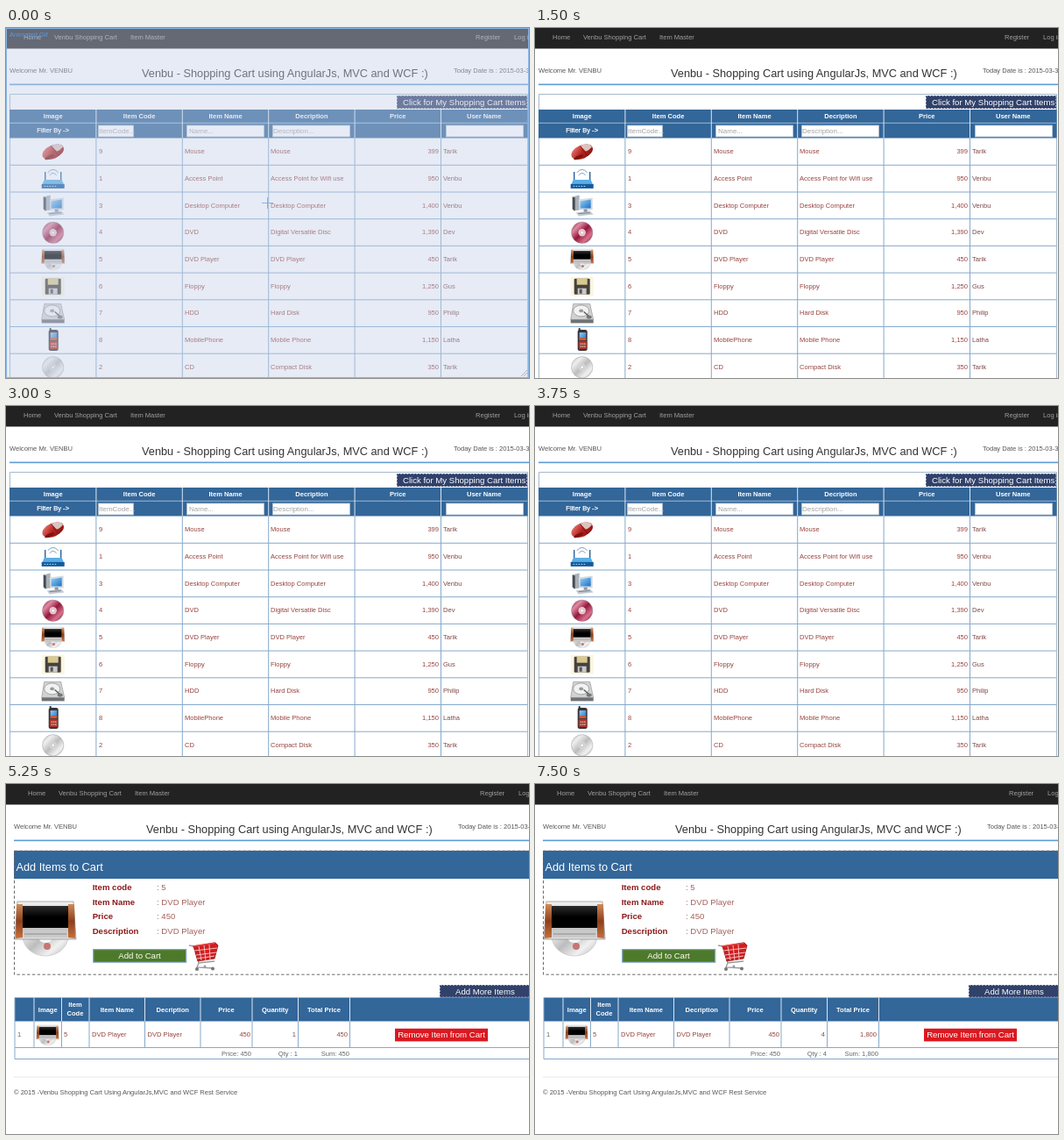
These frames come from a looping animation (597x399 px, 8 s). An HTML page:

```html
<!DOCTYPE html>
<html lang="en">
<head>
<meta charset="utf-8">
<title>Shopping cart</title>
<style>
  html, body { margin: 0; width: 100%; height: 100%; overflow: hidden; background: #fff; }
  svg { display: block; width: 597px; height: 399px; overflow: hidden; }
  text { font-family: "Liberation Sans", Arial, sans-serif; font-size: 7.55px; white-space: pre; }
  .b { font-weight: bold; }
  .m { text-anchor: middle; }
  .e { text-anchor: end; }
  .h1 { font-size: 12.75px; }
  .h2 { font-size: 9.6px; }
  .ph { font-size: 8px; }
  .kr { font-family: "Noto Sans CJK KR", "Noto Sans CJK", "Open Sans", sans-serif; }
</style>
</head>
<body>
<svg id="stage" viewBox="0 0 597 399" xmlns="http://www.w3.org/2000/svg"></svg>
<script>
const LOOP = 8000, STEP = 750;
const BLUE = '#336699', NAVY = '#30416a', GRID = '#86a9cb', ITEM = '#97433f', WHITE = '#fff';

const text = (x, y, s, fill, cls = '', extra = '') =>
  `<text x="${x}" y="${y}" fill="${fill}" class="${cls}" ${extra}>${s}</text>`;
const rect = (x, y, w, h, fill, extra = '') =>
  `<rect x="${x}" y="${y}" width="${w}" height="${h}" fill="${fill}" ${extra}/>`;
const path = (d, fill, extra = '') => `<path d="${d}" fill="${fill}" ${extra}/>`;
const line = (d, stroke, w = 1, extra = '') => path(d, 'none', `stroke="${stroke}" stroke-width="${w}" ${extra}`);
const oval = (x, y, rx, ry, fill, extra = '') =>
  `<ellipse cx="${x}" cy="${y}" rx="${rx}" ry="${ry}" fill="${fill}" ${extra}/>`;
const group = (body, transform = '', id = '') =>
  `<g ${id && `id="${id}"`} ${transform && `transform="${transform}"`}>${body}</g>`;
const gradient = (id, dir, ...stops) =>
  `<linearGradient id="${id}" ${dir}>${stops.map((c, i) =>
    `<stop offset="${i / (stops.length - 1)}" stop-color="${c}"/>`).join('')}</linearGradient>`;
const DOWN = 'x1="0" y1="0" x2="0" y2="1"', DIAG = 'x1="0" y1="0" x2="1" y2="1"';

const defs = `<defs>
  ${gradient('silver', DOWN, '#f4f4f4', '#a9a9a9', '#e3e3e3')}
  ${gradient('wood', DOWN, '#d08a56', '#8c3f1c', '#c8703a')}
  ${gradient('screen', DOWN, '#2c2c2c', '#000', '#000')}
  ${gradient('red', DIAG, '#e88', '#b8231d', '#7c100d')}
  ${gradient('pink', DIAG, '#7c1330', '#e08aa4', '#94183c', '#d8718d', '#6d0f2a')}
  ${gradient('grey', DIAG, '#bbb', '#eee', '#bdbdbd', '#f1f1f1', '#b5b5b5')}
  ${gradient('sky', DIAG, '#8fd0f7', '#1d6fc4')}
</defs>`;

// Icons are drawn around their own centre.
const disc = (fill, hub) => oval(0, 0, 12.2, 12.2, fill, 'stroke="#888" stroke-width=".4"') +
  oval(0, 0, 4.2, 4.2, hub) + oval(0, 0, 1.7, 1.7, WHITE, 'stroke="#999" stroke-width=".4"');

const player =
  oval(0, 8, 26, 23, 'url(#grey)', 'stroke="#bbb" stroke-width=".6"') +
  oval(0, 12, 7, 4, '#f7f7f7') + oval(2, 20, 4, 4, '#c77671') +
  path('M-32-31H32L35 12H-35Z', 'url(#silver)', 'stroke="#777" stroke-width=".6"') +
  path('M-33-28H-26V10L-34 11Z M33-28H26V10L34 11Z', 'url(#wood)') +
  rect(-26, -26, 52, 25, 'url(#screen)') + rect(-25, 2, 50, 8, '#c9c9c9') +
  line('M-24 6H24', '#8e8e8e', 1.2);

const basket =
  line('M-16-13L-10-12 L-5 7 L13 5 M-5 7L-7 12L12 13', '#999', 1.3) +
  path('M-11-12L14-16L17-13L13 2L-6 5Z', '#d21d1f', 'stroke="#8e1012" stroke-width=".8"') +
  line('M-10-7L16-10 M-8-2L15-5 M-7 2L13-1 M-5-12L-2 4 M1-13L3 4 M7-14L8 3', '#f4cfcf', .9) +
  line('M-12-12L14-16', '#e9494b', 1.5) +
  oval(-7, 14, 2, 2, '#777') + oval(11, 13.5, 2, 2, '#777') + oval(2, 11, 1.4, 1.4, '#999');

const icons = {
  mouse: group(oval(0, 0, 13, 7.6, 'url(#red)') + path('M1-7Q10-8 13-1Q8 2 4 1Z', '#d9c4c0') +
    line('M1-7Q2-1 4 7', '#6f1310', .7) + oval(-6, 4, 6, 2, '#7a1512'), 'rotate(-24)'),
  router: line('M-9 3V-8 M9 3V-8', '#2a5f9e', 1.4) +
    line('M-6-7Q0-14 6-7 M-4-4Q0-9 4-4', '#7a9cc0', 1) +
    path('M-10 1H10L13 8H-13Z', '#58aee4') + rect(-13, 6, 26, 5, '#155a9f') +
    line('M-10 8.5H4', '#bfe4ff', 1, 'stroke-dasharray="1.5 1.5"'),
  desktop: path('M-11-10L-3-12V5L-10 6Z', '#a9b0b8') + path('M-11-10L-8-9V6L-11 4Z', '#444c55') +
    path('M-4-7L12-9V5L-3 5Z', '#d5dbe2') + path('M-2-5L10-7V3L-2 3Z', 'url(#sky)') +
    path('M-7 8L9 6L13 10L-4 12Z', '#c3c9d0') + line('M-4 9L9 8', '#707984', .9) + rect(2, 4, 4, 3, '#8e969f'),
  dvd: disc('url(#pink)', '#e9c6cf'),
  player: group(player, 'scale(.38)'),
  floppy: rect(-13, -11, 26, 22, '#fbf6df') + rect(-9, -9, 18, 18, '#45413f', 'rx="1"') +
    rect(-6, -9, 12, 7, '#d9c98d') + rect(-5, 2, 10, 7, '#c9c9c9') + rect(-3, 3, 3, 5, '#555'),
  hdd: path('M-10-11H9L13 7H-13Z', '#d2d2d2', 'stroke="#8c8c8c" stroke-width=".6"') +
    rect(-13, 7, 26, 4, '#6f7275') + oval(-1, -3, 9, 6.5, '#f2f2f2', 'stroke="#888" stroke-width=".7"') +
    oval(-1, -3, 2.5, 1.8, '#999') + line('M9 4L2-2', '#555', 1.3) + oval(8, 4, 3, 2, '#777'),
  phone: rect(-5, -12, 11, 24, '#3b3236', 'rx="2.5"') + rect(-4, -14, 2, 4, '#333') +
    rect(-3, -9, 7.5, 9, 'url(#sky)') + rect(-3, -3, 7.5, 3, '#d8552e') +
    rect(-4, 1, 9.5, 9, '#a9372b', 'rx="1.5"') + line('M-2 4H4 M-2 7H4', '#e9d6d0', 1.2, 'stroke-dasharray="1.4 .8"'),
  cd: disc('url(#grey)', '#d5d5d5')
};
const icon = (name, x, y) => group(icons[name], `translate(${x} ${y})`);

const items = [
  ['mouse', 9, 'Mouse', 'Mouse', '399', 'Tarik'],
  ['router', 1, 'Access Point', 'Access Point for Wifi use', '950', 'Venbu'],
  ['desktop', 3, 'Desktop Computer', 'Desktop Computer', '1,400', 'Venbu'],
  ['dvd', 4, 'DVD', 'Digital Versatile Disc', '1,390', 'Dev'],
  ['player', 5, 'DVD Player', 'DVD Player', '450', 'Tarik'],
  ['floppy', 6, 'Floppy', 'Floppy', '1,250', 'Gus'],
  ['hdd', 7, 'HDD', 'Hard Disk', '950', 'Philip'],
  ['phone', 8, 'MobilePhone', 'Mobile Phone', '1,150', 'Latha'],
  ['cd', 2, 'CD', 'Compact Disk', '350', 'Tarik']
];

function header() {
  const links = [[20, 'Home'], [55, 'Venbu Shopping Cart'], [142, 'Item Master'], [536, 'Register'], [580, 'Log in']];
  return links.map(([x, s]) => text(x, 12.6, s, '#a0a0a0')).join('') +
    text(4, 50.6, 'Welcome Mr. VENBU', '#555') +
    text(155, 55.5, 'Venbu - Shopping Cart using AngularJs, MVC and WCF :)', '#333', 'h1') +
    text(511, 50.6, 'Today Date is : 2015-03-30', '#555') +
    rect(4, 63.6, 600, 1.6, '#5a9bd5');
}

function darkButton(x, y, w, h, label, tx) {
  return rect(x, y, w, h, NAVY) +
    rect(x + .5, y + .5, w - 1, h - 1, 'none', 'stroke="#c3cad8" stroke-width=".8" stroke-dasharray="2 1.6"') +
    text(tx, y + 11, label, WHITE, 'h2');
}

function list() {
  const col = i => 4.5 + 98.4 * i, rowY = i => 125.6 + 30.7 * i;
  const heads = ['Image', 'Item Code', 'Item Name', 'Decription', 'Price', 'User Name'];
  const inputs = [[105, 41, 'ItemCode...', 106], [206, 89, 'Name...', 209], [304, 89, 'Description...', 305], [502, 89, '', 0]];
  let s = line('M4.5 420V75.5H595.5V420', '#a3b9cc') +
    darkButton(446, 77, 149, 15, 'Click for My Shopping Cart Items', 453) +
    rect(4, 93, 591.5, 32.5, BLUE) + line('M4 108.3H595', '#a9c1da', .9);
  heads.forEach((h, i) => {
    s += text(col(i) + 49.2, 102.6, h, WHITE, 'b m');
    if (i) s += line(`M${col(i)} 93V125.5`, '#dbe6f1') + line(`M${col(i)} 125.5V420`, GRID);
  });
  s += text(53.7, 119, 'Filter By -&gt;', WHITE, 'm', 'stroke="#fff" stroke-width=".25"');
  for (const [x, w, label, tx] of inputs)
    s += rect(x + .5, 111, w - 1, 13, WHITE, 'stroke="#b5c3d1" stroke-width=".8"') + text(tx, 120.3, label, '#a2a2a2', 'ph');
  items.forEach(([pic, code, name, info, price, user], i) => {
    const y = rowY(i), base = y + 17.5;
    s += line(`M4 ${y + 30.7}H595`, GRID) + icon(pic, 53.7, y + 15.6) +
      text(106, base, code, ITEM) + text(204, base, name, ITEM) + text(302, base, info, ITEM) +
      text(494, base, price, ITEM, 'e') + text(499, base, user, '#7d4744');
  });
  return s;
}

function details() {
  const rows = [['Item code', 5], ['Item Name', 'DVD Player'], ['Price', 450], ['Description', 'DVD Player']];
  return rect(4, 76, 592, 32, BLUE) +
    rect(4.5, 76.2, 591, 141, 'none', 'stroke="#6a6a6a" stroke-dasharray="3.4 2.4"') +
    text(6.5, 99, 'Add Items to Cart', WHITE, 'h1') +
    group(player, 'translate(40 165)') +
    rows.map(([k, v], i) => text(93.7, 121 + 16.5 * i, k, '#8b1a1a', 'h2 b') +
      text(167, 121 + 16.5 * i, ': ' + v, '#a3615c', 'h2')).join('') +
    rect(95, 189, 105, 14, '#4d7a2a') +
    rect(94.7, 188.6, 106, 14.6, 'none', 'id="focus" stroke="#7da3c4" stroke-width="1.2"') +
    text(147.5, 199.3, 'Add to Cart', WHITE, 'h2 m') +
    group(basket, 'translate(220 197)');
}

function cart() {
  const cols = [10, 32, 63.5, 95, 158.5, 222, 281, 333.5, 392.5];
  const heads = ['', 'Image', '', 'Item Name', 'Decription', 'Price', 'Quantity', 'Total Price'];
  let s = darkButton(495, 229, 110, 14.5, 'Add More Items', 513) + rect(10, 243.5, 595, 27, BLUE);
  heads.forEach((h, i) => s += text((cols[i] + cols[i + 1]) / 2, 259.6, h, WHITE, 'b m'));
  s += text(79, 254.2, 'Item', WHITE, 'b m') + text(79, 264.4, 'Code', WHITE, 'b m');
  cols.slice(1).forEach(x => s += line(`M${x} 243.5V270.5`, '#dbe6f1') + line(`M${x} 270.5V300.5`, GRID));
  s += line('M10 243.5V313.5H600 M10 300.5H600', GRID) +
    text(13, 287.8, 1, '#666') + group(player, 'translate(47.5 286.5) scale(.37)') +
    text(66, 287.8, 5, ITEM) + text(98, 287.8, 'DVD Player', ITEM) + text(161.5, 287.8, 'DVD Player', ITEM) +
    text(279, 287.8, 450, ITEM, 'e') + text(331, 287.8, '', ITEM, 'e', 'id="qty"') +
    text(390, 287.8, '', ITEM, 'e', 'id="total"') +
    rect(444, 278.8, 106, 14.6, '#dc1820') + text(497, 289.4, 'Remove Item from Cart', WHITE, 'h2 m') +
    text(280, 309.6, 'Price: 450', '#666', 'e') + text(333, 309.6, '', '#666', 'e', 'id="qtySum"') +
    text(392, 309.6, '', '#666', 'e', 'id="sum"') +
    line('M9 334H600', '#e6e6e6') +
    text(9, 353.6, '© 2015 -Venbu Shopping Cart Using AngularJs,MVC and WCF Rest Service', '#555');
  return s;
}

function dialog() {
  const body = (y, s) => text(216, y, s, '#444', 'kr', 'style="font-size:7.1px"');
  return rect(205, -4, 212.5, 96, '#f8fbfc', 'stroke="#b9b4ae"') + line('M205 91.8H417.5', '#c4a78f', 1.2) +
    text(216, 12, 'localhost:2210의 페이지 내용:', '#555', 'kr', 'style="font-size:9.2px"') +
    line('M406.8 1.2L411.2 5.8M411.2 1.2L406.8 5.8', '#555', 1.1) +
    body(35.6, 'There is no Items In your Cart.Add Items to view your Cart') + body(45.6, 'Details !') +
    rect(362.5, 61, 42, 16.5, '#fbfdfe', 'stroke="#7ba4cc" rx="1"') +
    text(383.5, 72, '확인', '#333', 'kr m', 'style="font-size:7.4px"');
}

function veil() {
  return rect(0, 0, 597, 399, 'rgb(194,206,231)', 'opacity=".41"') +
    line('M.5 0V398.5H597M596.5 0V399M0 .5H597', '#86b2e6') +
    line('M298.5 193V206M292 199.5H305', '#86b2e6') +
    line('M588 397L595 390M591 397L595 393', '#9aa8bd', .8) +
    text(4, 9.6, 'Animated Gif', '#5f97e0');
}

const stage = document.getElementById('stage');
stage.innerHTML = defs + rect(0, 0, 597, 399, WHITE) + rect(0, 0, 597, 23.5, '#222') +
  group(list(), '', 'list') + group(header() + group(details(), '', 'details'), '', 'page') +
  group(cart(), '', 'cart') + group(dialog(), '', 'dialog') + group(veil(), '', 'veil');

const $ = id => document.getElementById(id);
const show = (id, on) => $(id).setAttribute('display', on ? 'inline' : 'none');
const put = (id, s) => { $(id).textContent = s; };

let shown = -1;
function draw(ms) {
  const k = Math.floor((ms % LOOP) / STEP);
  if (k === shown) return;
  shown = k;
  const inCart = k >= 7, qty = Math.max(1, k - 6), total = (450 * qty).toLocaleString('en-US');
  show('veil', k === 0);
  show('dialog', k === 3);
  show('list', !inCart);
  show('details', k >= 6);
  show('focus', inCart);
  show('cart', inCart);
  $('list').setAttribute('transform', `translate(0 ${k === 6 ? 153.3 : 0})`);
  $('page').setAttribute('transform', `translate(${inCart ? 5 : 0} 0)`);
  put('qty', qty);
  put('total', total);
  put('qtySum', 'Qty : ' + qty);
  put('sum', 'Sum: ' + total);
}

const start = performance.now();
function tick() {
  draw(performance.now() - start);
  requestAnimationFrame(tick);
}
tick();
</script>
</body>
</html>
```
